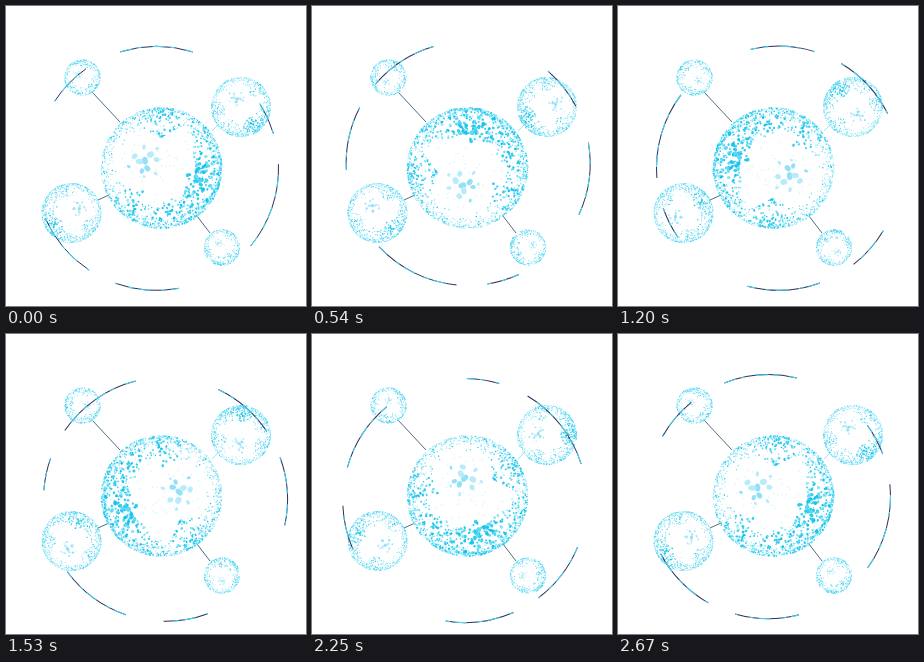
An HTML page with a canvas that plays this animation: 300 px wide and 300 px high, repeating every 2700 ms.

```html
<!DOCTYPE html>
<html lang="en">
<head>
<meta charset="utf-8">
<title>Orbiting spheres</title>
<style>
html, body { margin: 0; width: 100%; height: 100%; overflow: hidden; background: #fff; }
canvas { display: block; width: 100vw; height: 100vh; }
</style>
</head>
<body>
<canvas id="stage" width="300" height="300"></canvas>
<script>
const ctx = document.getElementById('stage').getContext('2d');
const TAU = Math.PI * 2;
const LOOP = 2700, STEP = 30;
const NAVY = '#2b3157', CYAN = '#4fd5f2';
const rad = deg => deg * Math.PI / 180;

function seeded(seed) {
  return () => {
    seed = (seed + 0x6D2B79F5) | 0;
    let v = Math.imul(seed ^ (seed >>> 15), 1 | seed);
    v = (v + Math.imul(v ^ (v >>> 7), 61 | v)) ^ v;
    return ((v ^ (v >>> 14)) >>> 0) / 4294967296;
  };
}

// Closeness of two angles in degrees, 1 at the centre and 0 beyond the width.
function near(angle, centre, width) {
  const d = Math.abs(((angle - centre + 540) % 360) - 180);
  return Math.max(0, 1 - d / width);
}

// Speckles on a unit sphere: coarse on one side, a fine haze along the rim.
function makeSpeckles(seed, count, radius) {
  const random = seeded(seed);
  const tones = ['#1cc3e9', '#35cef0', '#5edaf4', '#8ee6f8', '#b6effb'];
  const dots = [];
  const add = (angle, distance, size, stretch, tone) => dots.push({
    x: Math.cos(rad(angle)) * distance, y: Math.sin(rad(angle)) * distance,
    size: Math.max(size, 0.5 / radius), stretch, turn: random() * TAU, tone
  });

  for (let i = 0; i < count * 0.9; i++) {
    const depth = Math.pow(random(), 2) * 0.16;
    add(random() * 360, 0.99 - depth, 0.6 / 61, 1, tones[2 + Math.floor(random() * 3)]);
  }
  for (let placed = 0; placed < count;) {
    const angle = random() * 360;
    const coarse = near(angle, 15, 80);
    const clump = Math.max(near(angle, 270, 32), near(angle, 78, 35), near(angle, 127, 36));
    const weight = Math.max(coarse, clump * 0.85);
    if (random() > 0.25 + weight * 0.75) continue;
    const depth = Math.pow(random(), 1.9) * (0.25 + 0.3 * weight);
    const bulk = Math.max(coarse, clump * 0.5) * Math.min(1, 0.25 + depth * 6) * random();
    const shade = Math.floor(random() * (5 - weight * 2.4));
    add(angle, 0.985 - depth, (0.55 + random() * 0.4 + bulk * 1.5) / 61, 0.7 + random() * 0.3, tones[shade]);
    placed++;
  }
  for (let i = 0; i < count / 16; i++) {
    add(random() * 360, Math.sqrt(random()) * 0.75, 0.012, 0.8, '#c6f2fb');
  }

  // Pale patch of larger flecks.
  for (let i = 0; i < 12; i++) {
    const a = i * 2.4 + random() * 0.8, d = 0.075 * Math.sqrt(i) * (0.8 + random() * 0.5);
    dots.push({
      x: -0.27 + Math.cos(a) * d * 1.1, y: -0.12 + Math.sin(a) * d,
      size: 0.066 - i * 0.0035, stretch: 0.65 + random() * 0.2, turn: random() * TAU,
      tone: i % 3 ? '#b8ecfa' : '#93e0f7'
    });
  }
  return dots;
}

const sphere = (x, y, r, turn, spin, count, seed) =>
  ({ x, y, r, turn, spin, dots: makeSpeckles(seed, count, r) });

const spheres = [
  sphere(155.5, 162, 61, 0, -1, 760, 11),
  sphere(235, 101, 30, 41, 1, 430, 23),
  sphere(65.5, 207, 30, 128, -1, 430, 37),
  sphere(76.5, 71.5, 18, 15, -1, 210, 41),
  sphere(216, 241.5, 18, 34, 1, 210, 59)
];

// Start and end angle, with the dash phase of the cyan overlay.
const arcs = [
  [252.7, 287.3, 0], [213.4, 234.6, 20], [-32, -16.6, 4],
  [-2, 39.5, 22], [79.4, 109.8, 4], [123.5, 156, 18]
];

// Cubic easing with a quick start: x = 1.5s² - 0.5s³.
function ease(x) {
  let low = 0, high = 1;
  for (let i = 0; i < 30; i++) {
    const s = (low + high) / 2;
    if (1.5 * s * s - 0.5 * s * s * s < x) low = s; else high = s;
  }
  const s = low, q = 1 - s;
  return 3 * s * q * q * 0.155 + 3 * s * s * q * 0.512 + s * s * s;
}

function line(x1, y1, x2, y2, colour) {
  ctx.strokeStyle = colour;
  ctx.lineWidth = 1;
  ctx.beginPath();
  ctx.moveTo(x1, y1);
  ctx.lineTo(x2, y2);
  ctx.stroke();
}

function drawSphere({ x, y, r, turn, spin, dots }, angle) {
  ctx.save();
  ctx.translate(x, y);
  ctx.rotate(rad(turn + spin * angle));
  ctx.scale(r, r);
  for (const dot of dots) {
    ctx.fillStyle = dot.tone;
    ctx.beginPath();
    ctx.ellipse(dot.x, dot.y, dot.size, dot.size * dot.stretch, dot.turn, 0, TAU);
    ctx.fill();
  }
  ctx.restore();
}

function drawRing(angle) {
  ctx.save();
  ctx.translate(155.5, 162.4);
  ctx.rotate(rad(angle));
  for (const [from, to, phase] of arcs) {
    ctx.beginPath();
    ctx.arc(-5, 0, 122, rad(from), rad(to));
    ctx.setLineDash([]);
    ctx.strokeStyle = NAVY;
    ctx.lineWidth = 1;
    ctx.stroke();
    ctx.setLineDash([12, 5, 5, 11]);
    ctx.lineDashOffset = phase;
    ctx.strokeStyle = CYAN;
    ctx.lineWidth = 1.1;
    ctx.stroke();
  }
  ctx.restore();
}

function draw(time) {
  const angle = 360 * ease(time / LOOP);
  ctx.fillStyle = '#fff';
  ctx.fillRect(0, 0, 300, 300);
  line(86, 86, 114, 116, '#4f6f80');
  line(92, 194, 103, 189, '#4f6f80');
  line(191, 210, 204, 227, '#4f6f80');
  line(206, 125, 213, 118, '#9fe3f2');
  for (const item of spheres) drawSphere(item, angle);
  drawRing(angle);
}

const start = performance.now();
function tick() {
  const time = (performance.now() - start) % LOOP;
  draw(Math.floor(time / STEP) * STEP);
  requestAnimationFrame(tick);
}
tick();
</script>
</body>
</html>
```
